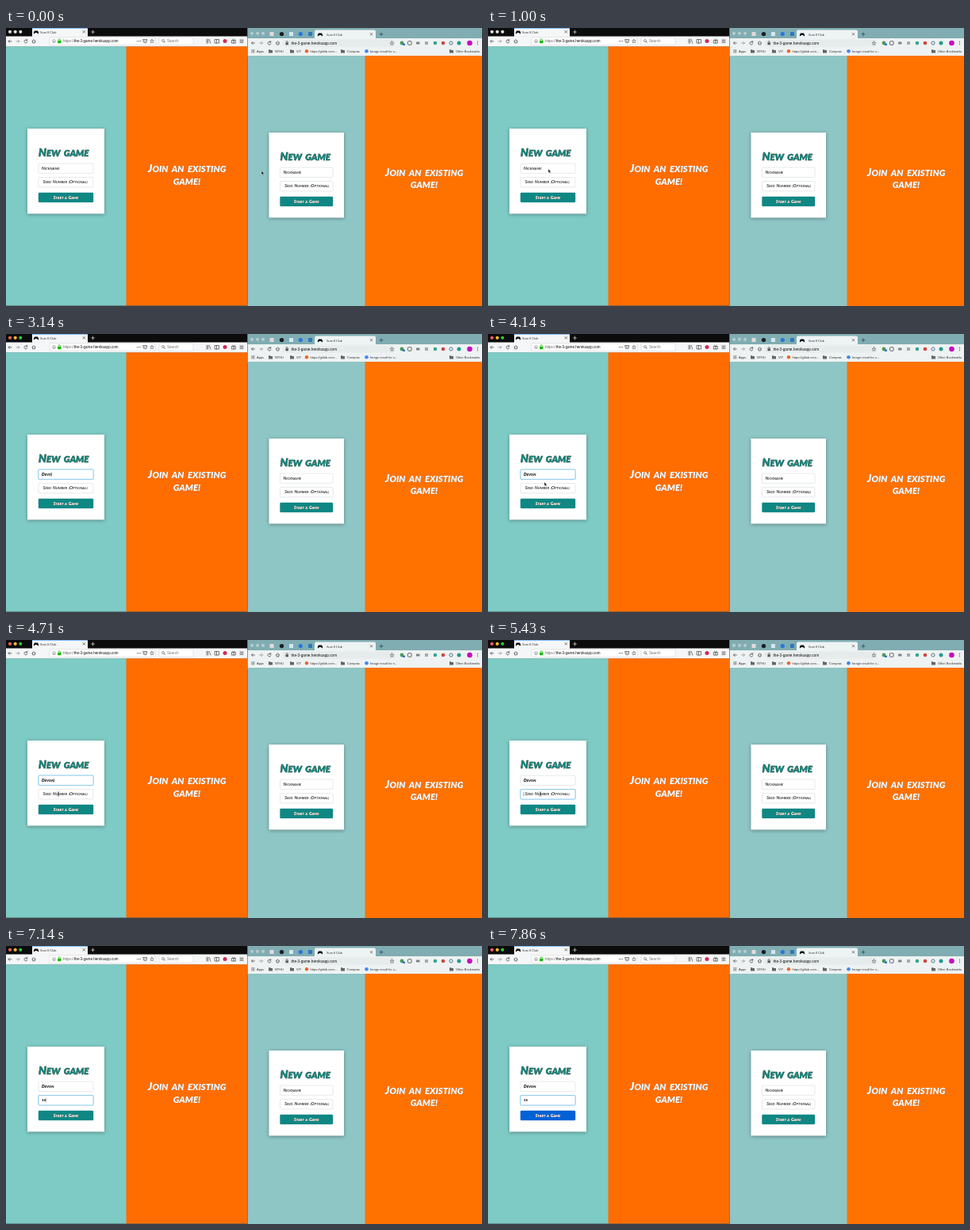
An HTML page for the animation above (8 s loop, 600 px wide and 351 px high).

```html
<!DOCTYPE html>
<html lang="en">
<head>
<meta charset="utf-8">
<title>New game</title>
<style>
html, body { margin: 0; width: 100%; height: 100%; overflow: hidden; background: #4a5556; }
svg { display: block; }
text { font-family: "Liberation Sans", Arial, sans-serif; fill: #333; white-space: pre; }
.hand { font-family: Lato, "Open Sans", sans-serif; font-weight: 700; font-style: italic; text-transform: uppercase; word-spacing: .2em; }
.hand tspan { font-size: 1.2em; }
.mid { text-anchor: middle; }
.line { fill: none; stroke-width: .8; stroke-linecap: round; stroke-linejoin: round; }
.big { font-size: 11.3px; font-weight: 900; fill: #fff; stroke: #fff; stroke-width: .2; stroke-linejoin: round; filter: drop-shadow(.9px .9px .4px #000a); }
.title { font-size: 11.5px; font-weight: 900; fill: #12857f; stroke: #12857f; stroke-width: .35; stroke-linejoin: round; filter: drop-shadow(.8px .7px 0 #c8553a); }
.action { font-size: 4.35px; font-weight: 900; fill: #fff; filter: drop-shadow(.4px .4px 0 #a53d1d); }
.typed { font-weight: 900; fill: #111; }
.field { fill: #fff; stroke: #d3d8dc; stroke-width: .6; }
.field.focus { stroke: #7cc0e6; stroke-width: .7; filter: drop-shadow(0 0 .6px #58b4ea); }
.btn { fill: #0f8783; stroke: #138488; stroke-width: .4; }
.btn.hover { fill: #0062d6; stroke: #0058c4; }
.card { fill: #fff; filter: drop-shadow(0 1px 2px #0005); }
</style>
</head>
<body>
<svg id="stage" width="100%" height="100%" viewBox="0 0 600 351" preserveAspectRatio="none"></svg>
<script>
const stage = document.getElementById('stage');

const rect = (x, y, w, h, fill, r = 0, extra = '') =>
  `<rect x="${x}" y="${y}" width="${w}" height="${h}" rx="${r}" fill="${fill}" ${extra}/>`;
const dot = (x, y, r, fill, extra = '') => `<circle cx="${x}" cy="${y}" r="${r}" fill="${fill}" ${extra}/>`;
const line = (d, color = '#555') => `<path class="line" d="${d}" stroke="${color}"/>`;
const label = (x, y, size, str, fill = '#333') => `<text x="${x}" y="${y}" font-size="${size}" style="fill:${fill}">${str}</text>`;

// Marker lettering: all capitals, with the true capitals a little taller
const caps = str => str.replace(/[A-Z]/g, '<tspan>$&</tspan>');
const hand = (x, y, cls, str, attrs = '') => `<text class="hand ${cls}" x="${x}" y="${y}" ${attrs}>${caps(str)}</text>`;

const folder = x => `<path d="M${x - 2.5} 27.2h2l.6 .7h2.4v3.6h-5z" fill="#666"/>`;
const gamepad = (x, y) =>
  `<path d="M${x - 2} ${y - 1.5}h4q1.2 1 1.2 3.6q-1 .7-2-1h-2.4q-1 1.7-2 1q0-2.6 1.2-3.6z" fill="#111"/>`;
const menu = (x, y) => line(`M${x - 2} ${y - 1.7}h4m-4 1.7h4m-4 1.7h4`);
const star = (x, y) =>
  line(`M${x} ${y - 2.4}l.7 1.6 1.7.1-1.3 1.2.4 1.7-1.5-.9-1.5.9.4-1.7-1.3-1.2 1.7-.1z`, '#777');
const reload = (x, y) => line(`M${x + 1.7} ${y - 1}a2 2 0 1 0 .2 1.8m-.2-3.3v1.6h-1.5`);
const arrows = (x, y) => line(`M${x + 2} ${y}h-4l1.7-1.7m-1.7 1.7l1.7 1.7`) +
  line(`M${x + 8} ${y}h4l-1.7-1.7m1.7 1.7l-1.7 1.7`, '#999');
const home = (x, y) => line(`M${x - 2.3} ${y}l2.3-2.2 2.3 2.2m-3.7-.7v2.7h2.8v-2.7`);

function card(x, y, w, key) {
  const ix = x + 14, iw = w - 28;
  const field = (id, dy, text, indent) =>
    `<rect id="${key}${id}Box" class="field" x="${ix}" y="${y + dy}" width="${iw}" height="12.3" rx="1"/>
    <svg x="${ix}" y="${y + dy}" width="${iw - 4.2}" height="12.3">
      ${hand(indent, 7.9, '', text, `id="${key}${id}" font-size="4.35"`)}
    </svg>`;
  return `<rect class="card" x="${x}" y="${y}" width="${w}" height="107.5"/>
    ${hand(ix, y + 34.7, 'title', 'New game')}
    ${field('Name', 44.1, 'Nickname', 4)}
    ${field('Seed', 61.6, 'Seed Number (Optional)', 5.7)}
    <rect id="${key}Btn" class="btn" x="${ix}" y="${y + 81}" width="${iw}" height="12" rx="1"/>
    ${hand(x + w / 2, y + 88.8, 'action mid', 'Start a Game')}`;
}

const join = (x, y) => hand(x, y, 'big mid', 'Join an existing') + hand(x, y + 15.3, 'big mid', 'game!');

const leftWindow = [
  rect(0, 0, 304, 11, '#0c0c0d'),
  [5, 11.7, 18.3].map((x, i) => dot(x, 4.8, 2.1, '#ddd', `id="light${i}"`)).join(''),
  rect(33, 0, 70, 11, '#f5f6f7'), rect(33, 0, 70, .5, '#0a84ff'),
  gamepad(38, 5), label(43, 6.6, 3.9, 'Sum 8 Club'),
  line('M97 3.5l2.6 2.6m0-2.6l-2.6 2.6'), line('M109.5 3v4m-2-2h4', '#ccc'),
  rect(0, 10.5, 304, 13, '#f5f6f7'),
  arrows(5, 16.8), reload(25, 16.8), home(35, 16.8),
  rect(55, 11.8, 133, 9.6, '#fff', 1, 'stroke="#ccc" stroke-width=".5"'),
  dot(60.5, 16.6, 2, 'none', 'stroke="#777" stroke-width=".6"'), line('M60.5 16.4v1.2', '#777'),
  rect(65, 16, 4.4, 3.2, '#12bc00', .4), line('M66 16v-1a1.2 1.2 0 0 1 2.4 0v1', '#12bc00'),
  label(72, 18.2, 4.55, '<tspan fill="#666">https://</tspan>the-3-game.herokuapp.com', '#111'),
  [165.5, 167.5, 169.5].map(x => dot(x, 16.6, .65, '#555')).join(''),
  line('M173 14.5h4.6v2a2.3 2.3 0 0 1-4.6 0zm1.2 1.5l1.1 1 1.1-1'), star(184, 16.7),
  rect(193, 11.8, 43, 9.6, '#fff', 1, 'stroke="#ccc" stroke-width=".5"'),
  dot(198, 16, 1.5, 'none', 'stroke="#555" stroke-width=".6"'), line('M199.2 17.2l1.2 1.2'),
  label(203, 18.2, 4.6, 'Search', '#777'),
  line('M253 14.3v4.8m1.6-4.8v4.8m1.6-4.8l1.6 4.8'),
  line('M263.5 14.5h5v4.5h-5zm2 0v4.5'),
  dot(276, 16.6, 2.5, '#d12a58'),
  line('M284.7 15.5h4.6v3.5h-4.6zm2.3 0v3.5m0-3.5l-1.3-1.2m1.3 1.2l1.3-1.2'), menu(297, 16.7),
  rect(0, 23.3, 152, 327.2, '#7ecac4'), rect(151.5, 23.3, 152.5, 327.2, '#ff6d00'),
  card(27, 127, 97, 'a'), join(228, 182.3),
];

const bookmarks = [[339, 'NTHU'], [366, 'VIT'], [430, 'Compras'], [567, 'Other Bookmarks']];

const rightWindow = [
  rect(304.6, 0, 295.4, 14, '#80adb2'),
  [310, 317, 324].map(x => dot(x, 6.8, 2.1, '#b5cccf')).join(''),
  rect(332.5, 5, 5, 5, '#e5dada', .5), dot(347.5, 7.6, 2.7, '#172024'),
  rect(357, 5, 5, 5, '#d5e7f2', .5), dot(371.3, 7.6, 2.6, '#2477e0'), rect(381, 5, 5, 5, '#2d78bd', .5),
  rect(389, 2.5, 77, 14, '#eef3f3', 2),
  gamepad(396, 8), label(404, 9.5, 3.8, 'Sum 8 Club'),
  line('M459.3 6.5l2.4 2.4m0-2.4l-2.4 2.4'), line('M473 5.8v4m-2-2h4', '#345'),
  rect(304.6, 13, 295.4, 23, '#eef2f2'),
  arrows(311.5, 19), reload(332, 19), home(342.5, 19),
  rect(348.5, 14.5, 142, 9.3, '#e6ebeb', 4.6),
  rect(352.5, 18.5, 3.4, 2.8, '#555', .3), line('M353.2 18.5v-.8a1 1 0 0 1 2 0v.8'),
  label(359.5, 20.7, 4.7, 'the-3-game.herokuapp.com', '#111'), star(486.5, 19.2),
  dot(499, 19, 2.4, '#4b9b54'), rect(500, 19.5, 3, 2.6, '#2c75d8', .5),
  rect(506.5, 16.7, 4.6, 4.6, 'none', 1, 'stroke="#444" stroke-width=".8"'),
  rect(517, 17.5, 4.5, 3, '#808688', .5), rect(528, 17, 4, 4, '#a3aaac', .5),
  dot(541, 19, 2.3, '#35a58c'), dot(551, 19, 2.3, '#d2453c'),
  dot(561, 19, 2.1, 'none', 'stroke="#4d7896" stroke-width="1"'), dot(571, 19, 2.5, '#239b91'), dot(584.5, 19, 3.3, '#c40fbd'),
  [17.2, 19, 20.8].map(y => dot(594.5, y, .6, '#555')).join(''),
  [0, 1, 2].map(i => [0, 1, 2].map(j =>
    rect(309.3 + i * 1.5, 27.2 + j * 1.5, 1.1, 1.1, ['#d65745', '#4b9b54', '#4577c9'][(i + j) % 3])).join('')).join(''),
  label(316, 30.8, 4, 'Apps'),
  bookmarks.map(([x, str]) => folder(x - 5.5) + label(x, 30.8, 3.9, str)).join(''),
  dot(379, 29.3, 2.2, '#e8662d'), label(383.5, 30.8, 4, 'https://gitlab.com...'),
  dot(454.5, 29.3, 2.3, '#4285f4'), label(459, 30.8, 4, 'Image result for s...'),
  rect(304.6, 35, 148.4, 316, '#8ec5c5'), rect(452.5, 35, 147.5, 316, '#ff7200'),
  card(331.5, 132, 94.5, 'b'), join(527, 186.8),
];

stage.innerHTML = leftWindow.join('') + rightWindow.join('') + `
  <path id="caret" d="M0 -4v5" stroke="#222" stroke-width=".5"/>
  <path id="arrow" d="M0 0v4.6l1.1-.9.8 1.7.9-.4-.8-1.6h1.5z" fill="#111" stroke="#fff" stroke-width=".35"/>
  <path id="beam" class="line" d="M-1-2.7q1 0 1 .7v4q0 .7-1 .7m2-5.4q-1 0-1 .7v4q0 .7 1 .7" stroke="#333" style="stroke-width:.5"/>`;

const el = id => document.getElementById(id);
const LOOP = 8000, NICK = 'Devon', SEED = '56';
const ACTIVE = 1290, NAME_FOCUS = 1640, SEED_FOCUS = 5000, HOVER = 7600;
const NAME_KEYS = { from: 2430, step: 220 }, SEED_KEYS = { from: 6860, step: 280 };
const path = [ // time, x, y of the pointer
  [140, 322, 180.5], [950, 76, 178], [1290, 76, 178], [1650, 73, 177], [3400, 73, 177],
  [4000, 71, 187], [4250, 71, 187], [4700, 66, 194.5], [7250, 66, 194.5], [7650, 74, 213],
];

function pointer(t) {
  const i = path.findIndex(p => p[0] > t);
  if (i < 0) return path.at(-1).slice(1);
  if (!i) return path[0].slice(1);
  const [t0, x0, y0] = path[i - 1], [t1, x1, y1] = path[i];
  const u = (t - t0) / (t1 - t0), k = u * u * (3 - 2 * u);
  return [x0 + (x1 - x0) * k, y0 + (y1 - y0) * k];
}

const typed = (str, keys, t) => str.slice(0, Math.max(0, Math.floor((t - keys.from) / keys.step) + 1));
const show = (id, on) => el(id).setAttribute('visibility', on ? 'visible' : 'hidden');
const move = (id, x, y) => el(id).setAttribute('transform', `translate(${x} ${y})`);

function fill(id, value, placeholder, indent) {
  const node = el(id);
  node.innerHTML = caps(value || placeholder);
  node.classList.toggle('typed', value !== '');
  node.setAttribute('x', value ? 4 : indent);
  return value ? node.getComputedTextLength() + .4 : 0;
}

function draw(t) {
  const active = t >= ACTIVE, onSeed = t >= SEED_FOCUS, focused = t >= NAME_FOCUS;
  ['#ff5f57', '#febc2e', '#28c840'].forEach((c, i) => el('light' + i).setAttribute('fill', active ? c : '#ddd'));
  el('aNameBox').classList.toggle('focus', focused && !onSeed);
  el('aSeedBox').classList.toggle('focus', onSeed);
  el('aBtn').classList.toggle('hover', t >= HOVER);

  const name = typed(NICK, NAME_KEYS, t), seed = typed(SEED, SEED_KEYS, t);
  const nameW = fill('aName', name, 'Nickname', 4);
  const seedW = fill('aSeed', seed, 'Seed Number (Optional)', 5.7);

  // The caret restarts its blink on focus and on each key
  const keys = onSeed ? SEED_KEYS : NAME_KEYS, count = (onSeed ? seed : name).length;
  const since = count ? keys.from + (count - 1) * keys.step : onSeed ? SEED_FOCUS : NAME_FOCUS;
  show('caret', focused && (t - since) % 1000 < 500);
  move('caret', 45 + (onSeed ? seedW : nameW), onSeed ? 196.2 : 178.7);

  const [x, y] = pointer(t);
  const hidden = (t >= 2430 && t < 3400) || (t >= 6860 && t < 7250) || t >= HOVER;
  const inField = active && ((y > 171 && y < 183.4) || (y > 188.6 && y < 201));
  show('beam', !hidden && inField);
  show('arrow', !hidden && !inField);
  move('beam', x, y);
  move('arrow', x, y);
}

const start = performance.now();
function tick() {
  draw((performance.now() - start) % LOOP);
  requestAnimationFrame(tick);
}
tick();
</script>
</body>
</html>
```
